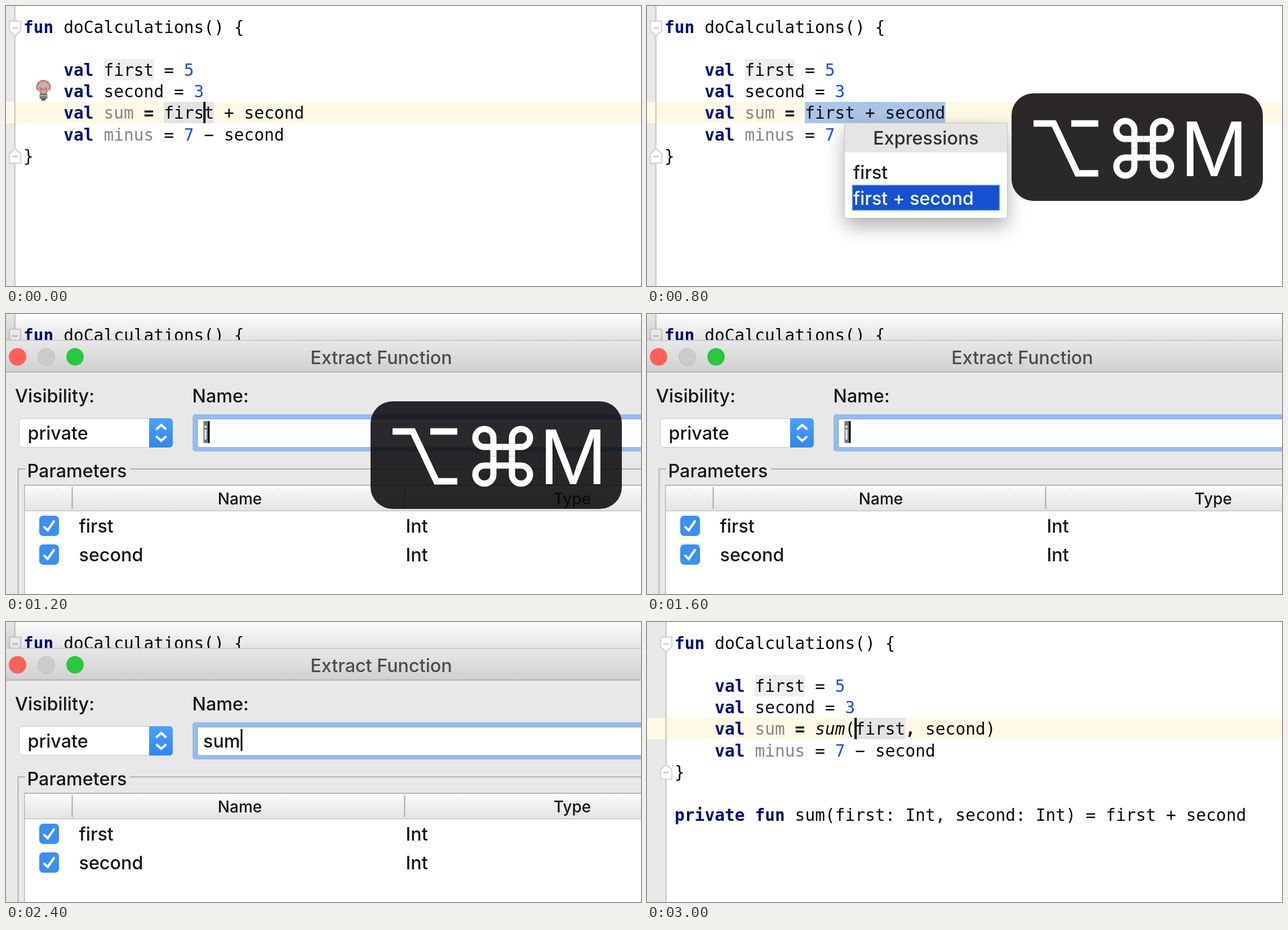
An HTML page with a canvas that plays this animation: 1127x497 px, repeating every 4000 ms.

```html
<!DOCTYPE html>
<html lang="en">
<head>
<meta charset="utf-8">
<title>Extract function</title>
<style>
html, body { margin: 0; width: 100%; height: 100%; overflow: hidden; background: #fff; }
canvas { display: block; }
</style>
</head>
<body>
<canvas id="stage" width="1127" height="497"></canvas>
<script>
const W = 1127, H = 497, LOOP = 4000;
const ctx = document.getElementById('stage').getContext('2d');
const CH = 17.8, ROW = 38.15, BASE = 47.8;
const MONO = '"DejaVu Sans Mono", monospace';
const UI = 'Inter, sans-serif';
const KEY = '#000f78', NUM = '#1750e0', DIM = '#85858a', INK = '#0a0a0a';

function rect(x, y, w, h, fill) {
  ctx.fillStyle = fill;
  ctx.fillRect(x, y, w, h);
}

function round(x, y, w, h, r, fill, stroke) {
  ctx.beginPath();
  ctx.roundRect(x, y, w, h, r);
  if (fill) { ctx.fillStyle = fill; ctx.fill(); }
  if (stroke) { ctx.strokeStyle = stroke; ctx.lineWidth = 1; ctx.stroke(); }
}

function disc(x, y, r, fill, stroke) {
  ctx.beginPath();
  ctx.arc(x, y, r, 0, Math.PI * 2);
  ctx.fillStyle = fill;
  ctx.fill();
  if (stroke) { ctx.strokeStyle = stroke; ctx.lineWidth = 1; ctx.stroke(); }
}

function line(color, width, ...pts) {
  ctx.beginPath();
  pts.forEach(([x, y], i) => i ? ctx.lineTo(x, y) : ctx.moveTo(x, y));
  ctx.strokeStyle = color;
  ctx.lineWidth = width;
  ctx.stroke();
}

function fade(y0, y1, a, b) {
  const g = ctx.createLinearGradient(0, y0, 0, y1);
  g.addColorStop(0, a);
  g.addColorStop(1, b);
  return g;
}

function label(text, x, y, { size = 32.3, color = '#161616', weight = 500, align = 'left' } = {}) {
  ctx.font = `${weight} ${size}px ${UI}`;
  ctx.fillStyle = color;
  ctx.textAlign = align;
  ctx.fillText(text, x, y);
}

// Editor

const HEAD = [
  [0, 0, 'fun', KEY, 'bold'], [4, 0, 'doCalculations() {'],
  [4, 2, 'val', KEY, 'bold'], [8, 2, 'first ='], [16, 2, '5', NUM],
  [4, 3, 'val', KEY, 'bold'], [8, 3, 'second ='], [17, 3, '3', NUM],
  [4, 4, 'val', KEY, 'bold'], [8, 4, 'sum', DIM], [12, 4, '=', INK, 'bold'],
  [4, 5, 'val', KEY, 'bold'], [8, 5, 'minus', DIM], [14, 5, '='], [16, 5, '7', NUM],
  [18, 5, '\u2212 second'], [0, 6, '}']
];
const BEFORE = [...HEAD, [14, 4, 'first + second']];
const AFTER = [
  ...HEAD,
  [14, 4, 'sum', INK, 'italic'], [17, 4, '(first'], [23, 4, ',', INK, 'bold'], [25, 4, 'second)'],
  [0, 8, 'private fun', KEY, 'bold'],
  [12, 8, 'sum(first: Int, second: Int) = first + second']
];

function foldMark(x, y, dir) {
  ctx.beginPath();
  ctx.moveTo(x - 10, y - 12 * dir);
  ctx.lineTo(x + 10, y - 12 * dir);
  ctx.lineTo(x + 10, y + 5 * dir);
  ctx.lineTo(x, y + 14 * dir);
  ctx.lineTo(x - 10, y + 5 * dir);
  ctx.closePath();
  ctx.fillStyle = '#fff';
  ctx.fill();
  ctx.strokeStyle = '#d6d6d6';
  ctx.lineWidth = 2.5;
  ctx.stroke();
  line('#c8c8c8', 2.5, [x - 5, y], [x + 5, y]);
}

function bulb() {
  disc(66.5, 144, 11.5, '#b9b6b4');
  ctx.beginPath();
  ctx.arc(66.5, 144, 11.5, Math.PI * 0.85, Math.PI * 2.15);
  ctx.strokeStyle = '#d9746c';
  ctx.lineWidth = 3;
  ctx.stroke();
  line('#e4625b', 2, [62, 157], [61, 145], [66.5, 149], [72, 145], [71, 157]);
  round(59.5, 155, 14, 10, 2, '#777');
  line('#aaa', 2, [60, 159], [73, 159]);
  round(62.5, 164, 8, 4, 2, '#5d5d5d');
}

function mark(left, row, col, count, fill) {
  rect(left + col * CH, BASE + row * ROW - 30.2, count * CH, 38, fill);
}

function editor({ left = 31, lines = BEFORE, caret = false, selected = 0 }) {
  const edge = left - 15;
  rect(0, 0, W, H, '#fff');
  rect(0, 0, edge - 1, H, '#e9e9e9');
  rect(0, 170, W, 38, '#fdf9e4');
  rect(edge - 1.5, 0, 2.5, H, '#cbcbcb');
  foldMark(edge, 39, 1);
  foldMark(edge, 267, -1);

  mark(left, 2, 8, 5, '#eeeeee');
  const use = lines === AFTER ? 18 : 14;
  if (selected) mark(left, 4, use, selected, '#abc5e8');
  else mark(left, 4, use, 5, '#e4e4e6');

  ctx.textAlign = 'left';
  for (const [col, row, text, color = INK, style = ''] of lines) {
    ctx.font = `${style} 29.57px ${MONO}`;
    ctx.fillStyle = color;
    ctx.fillText(text, left + col * CH, BASE + row * ROW);
  }
  if (caret) rect(left + 18 * CH - 1.2, 170, 4, 38, '#000');
}

function popup(pick) {
  ctx.save();
  ctx.shadowColor = 'rgba(0,0,0,.32)';
  ctx.shadowBlur = 32;
  ctx.shadowOffsetY = 13;
  rect(351, 208, 288, 169, '#fff');
  ctx.restore();
  rect(351, 208, 288, 52, '#e5e5e5');
  ctx.strokeStyle = '#c4c4c4';
  ctx.lineWidth = 1;
  ctx.strokeRect(350.5, 207.5, 289, 169);
  label('Expressions', 495, 246, { align: 'center', color: '#303030' });
  const top = 272 + pick * 45.5;
  rect(364, top, 262, 45.5, '#4a86ea');
  rect(365.5, top + 1.5, 259, 42.5, '#1651d2');
  ['first', 'first + second'].forEach((text, i) =>
    label(text, 366, 307 + i * 46, { color: i === pick ? '#fff' : '#1c1c1c' }));
}

// Shortcut badge

function commandSign(cx, cy) {
  const far = 32.5, r = 16, near = far - r;
  for (let i = 0; i < 4; i++) {
    ctx.save();
    ctx.translate(cx, cy);
    ctx.rotate(i * Math.PI / 2);
    ctx.beginPath();
    ctx.moveTo(-near, 0);
    ctx.lineTo(-near, -far);
    ctx.arc(-far, -far, r, 0, Math.PI / 2, true);
    ctx.lineTo(0, -near);
    ctx.strokeStyle = '#fff';
    ctx.lineWidth = 11;
    ctx.stroke();
    ctx.restore();
  }
}

function badge() {
  round(647, 155, 446, 191, 39, 'rgba(12,9,12,.87)');
  line('#fff', 11.5, [686, 208.5], [722, 208.5], [764, 297], [801, 297]);
  line('#fff', 11.5, [753, 208.5], [801, 208.5]);
  commandSign(881.5, 252.5);
  label('M', 1006.5, 302, { size: 133, weight: 400, color: '#fff', align: 'center' });
}

// Dialog

function checkRow(y, name) {
  round(59, y, 35, 36, 7, '#3b8ff7');
  ctx.lineCap = 'round';
  line('#fff', 4, [68, y + 20], [74, y + 26], [85, y + 10]);
  ctx.lineCap = 'butt';
  label(name, 129.5, y + 30);
  label('Int', 709.5, y + 30);
}

function dialog(name) {
  rect(0, 0, W, 47, fade(0, 47, 'rgba(0,0,0,.01)', 'rgba(0,0,0,.11)'));
  rect(0, 47, W, H - 47, '#e8e8e8');
  rect(0, 47, W, 56, fade(47, 103, '#e8e8e8', '#d0d0d0'));
  rect(0, 46, W, 1.5, '#c3c3c3');
  rect(0, 102, W, 2, '#b3b3b3');
  disc(20.5, 76, 15.5, '#fc605b');
  disc(71.5, 76, 15, '#cccccc', '#b9b9b9');
  disc(122.5, 76, 15.5, '#28c840');
  label('Extract Function', 666, 88.5, { align: 'center', color: '#4c4c4c' });

  label('Visibility:', 16, 157);
  label('Name:', 330.5, 157);

  round(23.5, 185.5, 272, 51, 6, '#fff', '#c6c6c6');
  round(254, 185, 42, 52, [0, 6, 6, 0], fade(185, 237, '#4c9ffb', '#2f86f7'));
  line('#fff', 4, [266.5, 205], [275.5, 197], [284.5, 205]);
  line('#fff', 4, [266.5, 217], [275.5, 225], [284.5, 217]);
  label('private', 38.5, 223);

  round(331, 178, W, 66, 5, '#96bbed');
  rect(339, 186, W, 50, '#86a8d6');
  rect(340.5, 187, W, 49, '#fff');
  if (name === 'i') {
    rect(350.5, 190, 10, 39, '#73777d');
    label('i', 350, 223, { color: '#d8ecff' });
    rect(358.5, 190, 3, 39, '#000');
  } else {
    label(name, 350, 223);
    rect(351 + ctx.measureText(name).width, 190, 3, 39, '#000');
  }

  line('#b2b2b2', 2, [34, 275], [21.5, 275], [21.5, H]);
  line('#b2b2b2', 2, [220, 275], [W, 275]);
  label('Parameters', 37.5, 290);

  rect(32, 303, W, H, '#b4b4b4');
  rect(33.5, 305, W, 44, fade(305, 349, '#fbfbfb', '#e3e3e3'));
  rect(33.5, 350, W, H, '#fff');
  for (const x of [117.5, 707.5]) line('#a8a8a8', 2, [x, 307], [x, 346]);
  label('Name', 415, 338, { size: 28, align: 'center' });
  label('Type', 1005, 338, { size: 28, align: 'center' });
  checkRow(358, 'first');
  checkRow(409, 'second');
}

function draw(t) {
  if (t < 400) {
    editor({ caret: true });
    bulb();
  } else if (t < 1000) {
    const pick = t < 800 ? 0 : 1;
    editor({ selected: pick ? 14 : 5 });
    popup(pick);
  } else if (t < 1200) {
    editor({ caret: true });
  } else if (t < 2600) {
    editor({});
    dialog(t < 2000 ? 'i' : t < 2200 ? 'su' : 'sum');
  } else if (t < 2800) {
    editor({});
  } else {
    editor({ left: 49, lines: AFTER, caret: true });
  }
  if (t >= 400 && t < 1400) badge();
}

const start = performance.now();
function tick() {
  draw((performance.now() - start) % LOOP);
  requestAnimationFrame(tick);
}
tick();
</script>
</body>
</html>
```
